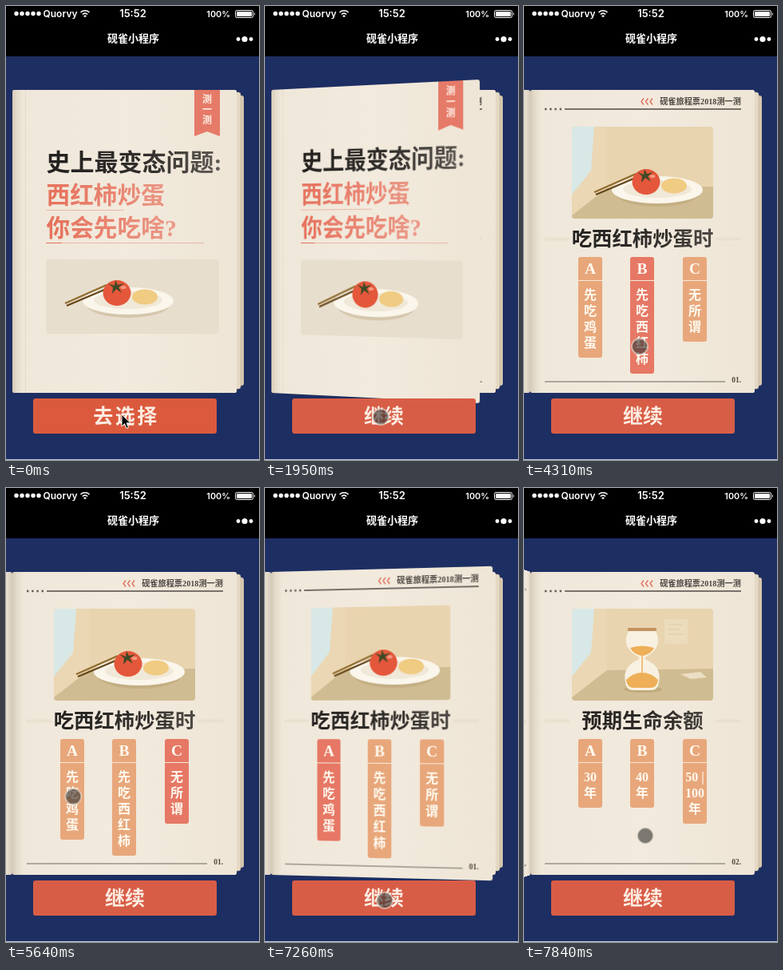
These frames come from a looping animation (317x568 px, 7.99 s). An HTML page:

```html
<!DOCTYPE html>
<html lang="zh-CN">
<head>
<meta charset="utf-8">
<title>测一测</title>
<style>
html, body { margin: 0; width: 100%; height: 100%; overflow: hidden; background: #1d2e62; }
#stage { position: relative; width: 317px; height: 568px; overflow: hidden; }
#stage > svg, #book { position: absolute; left: 0; top: 0; width: 317px; height: 568px; }
#book { perspective: 1900px; perspective-origin: 148.5px 294.5px; }
.page { position: absolute; left: 8px; top: 105px; width: 281px; height: 379px; transform-origin: 0 50%; }
.page svg { display: block; width: 281px; height: 379px; }
text { font-family: "Liberation Serif", "Noto Sans CJK SC", "Noto Sans CJK", serif; font-weight: 700; }
.heavy { font-weight: 900; }
.ui { font-family: Inter, "Noto Sans CJK SC", "Noto Sans CJK", sans-serif; font-weight: 600; fill: #fff; }
.opt rect { fill: #e8a77b; }
.opt.on rect { fill: #e67865; }
.opt text { fill: #fffaf0; }
</style>
</head>
<body>
<div id="stage">
  <svg viewBox="0 0 317 568">
    <defs>
      <linearGradient id="paper">
        <stop offset="0" stop-color="#d6cab8"/>
        <stop offset=".02" stop-color="#e4dbcb"/>
        <stop offset=".05" stop-color="#efe7d9"/>
        <stop offset=".5" stop-color="#f2eadd"/>
        <stop offset="1" stop-color="#eee5d6"/>
      </linearGradient>
      <linearGradient id="ink" gradientUnits="userSpaceOnUse" x1="50" y1="0" x2="268" y2="0">
        <stop offset=".1" stop-color="#242220"/>
        <stop offset=".6" stop-color="#33302d"/>
        <stop offset="1" stop-color="#5f5a54"/>
      </linearGradient>
      <linearGradient id="rose" gradientUnits="userSpaceOnUse" x1="50" y1="0" x2="220" y2="0">
        <stop offset="0" stop-color="#e6705b"/>
        <stop offset="1" stop-color="#eb9a89"/>
      </linearGradient>
      <clipPath id="frame"><rect x="60" y="151" width="177" height="115" rx="4"/></clipPath>
      <g id="dish">
        <ellipse cy="5" rx="52" ry="16" fill="#a98f62" opacity=".3"/>
        <ellipse rx="57" ry="17" fill="#faf6ec"/>
        <ellipse cy="-1" rx="43" ry="11" fill="#f0e8d8"/>
        <ellipse cx="21" cy="-5" rx="16" ry="9.5" fill="#f0cb82"/>
        <path d="M-79 3-27-20" stroke="#8f6c2e" stroke-width="2.2"/>
        <path d="M-77 6-25-16" stroke="#654619" stroke-width="2.4"/>
        <ellipse cx="-14" cy="-10" rx="17.5" ry="16" fill="#e4573b"/>
        <ellipse cx="-6" cy="-17" rx="3.5" ry="2" fill="#f29a80"/>
        <path d="M-25-22l8 3 1-7 3 6 8-2-7 5 4 7-7-5-5 6 1-8z" fill="#3d4a25"/>
      </g>
    </defs>
    <rect width="317" height="568" fill="#1d2e62"/>
    <rect x="270" y="112" width="28" height="363" rx="3" fill="#d5c6ae"/>
    <rect x="270" y="108" width="24" height="371" rx="3" fill="#e5d9c5" stroke="#c7b79f" stroke-width=".6"/>
  </svg>

  <div id="book"></div>

  <svg viewBox="0 0 317 568">
    <rect width="317" height="63"/>
    <g fill="#fff">
      <path d="M13 9.5h.01M20 9.5h.01M27 9.5h.01M34 9.5h.01M41 9.5h.01" stroke="#fff" stroke-width="5.4" stroke-linecap="round"/>
      <path d="M93.500 8a8 8 0 0 1 11 0M95.800 10.500a5 5 0 0 1 6.400 0" fill="none" stroke="#fff" stroke-width="1.6"/>
      <path d="M97 12.300a3 3 0 0 1 4 0l-2 2z"/>
      <rect x="287.500" y="5.500" width="22" height="9" rx="2" fill="none" stroke="#fff"/>
      <rect x="289" y="7" width="19" height="6" rx="1"/>
      <path d="M311 8q2 2 0 4z"/>
      <circle cx="291" cy="41.500" r="2.400"/><circle cx="299" cy="41.500" r="3.600"/><circle cx="307" cy="41.500" r="2.400"/>
    </g>
    <text class="ui" x="46.500" y="13.500" font-size="12">Quorvy</text>
    <text class="ui" x="159" y="13.500" font-size="13" text-anchor="middle">15:52</text>
    <text class="ui" x="281" y="13.500" font-size="10.800" text-anchor="end">100%</text>
    <text class="ui" x="159.500" y="45" font-size="13" text-anchor="middle">砚雀小程序</text>

    <rect id="button" x="34" y="491" width="230" height="44" rx="3"/>
    <text id="label" class="heavy" y="522" font-size="25" text-anchor="middle" fill="#fdece2"></text>
    <rect y="567" width="317" height="1" fill="#c9cfdb"/>
    <path id="arrow" d="M145 511v15l3.500-3.300 2.400 5.600 2.600-1.100-2.400-5.400h5z" stroke="#fff"/>
    <circle id="dot" r="10" fill="#3c3a38" fill-opacity=".65" stroke="#e6dfd4" stroke-opacity=".6" stroke-width="2"/>
  </svg>
</div>

<script>
const $ = id => document.getElementById(id);

// Text centred vertically on cy.
const txt = (x, cy, size, str, attrs = '') =>
  `<text x="${x}" y="${cy + size * .37}" font-size="${size}" ${attrs}>${str}</text>`;
const MID = 'text-anchor="middle"';

const page = (id, body) => `<div class="page" id="${id}"><svg viewBox="8 105 281 379">
  <rect x="8" y="105" width="281" height="379" rx="3" fill="url(#paper)"/>${body}</svg></div>`;

const option = (letter, x, lines) => {
  const h = 46 + lines.length * 20;
  return `<g class="opt" data-key="${letter}">
    <rect x="${x}" y="314" width="30" height="${h}" rx="3"/>
    <path d="M${x} 343.500h30" stroke="#f8e9d8"/>
    ${txt(x + 15, 328, 19.5, letter, MID)}
    ${lines.map((s, i) => txt(x + 15, 361 + i * 20, 16, s, MID)).join('')}</g>`;
};

const question = (id, title, number, picture, options) => page(id, `
  <path d="M150 115.500l-3 4 3 4M155.500 115.500l-3 4 3 4M161 115.500l-3 4 3 4" fill="none" stroke="#df6f5c" stroke-width="1.400"/>
  ${txt(272, 119, 10.2, '砚雀旅程票2018测一测', 'text-anchor="end" fill="#4a4540"')}
  <path d="M26 129h22" stroke="#5f5a55" stroke-width="2.400" stroke-dasharray="2.400 3.800"/>
  <path d="M51 129h221" stroke="#77716a" stroke-width="2"/>
  <g clip-path="url(#frame)">
    <path d="M60 151h177v115H60z" fill="#e9d4b0"/>
    <path d="M60 151h44v77l-44 34z" fill="#ebd7b4"/>
    <path d="M60 151h28l-4 55-24 30z" fill="#d8e8e6"/>
    <path d="M104 228l133-2v40H60v-4z" fill="#d0bc92"/>
    ${picture}
  </g>
  <path d="M25 290.500h32M240 290.500h32M25 292.500h32M240 292.500h32" stroke="#e2d7c5" stroke-width=".8"/>
  ${txt(148.5, 291, 25.4, title, `class="heavy" ${MID} fill="url(#ink)"`)}
  ${options.map((o, i) => option('ABC'[i], [68, 133, 199][i], o)).join('')}
  <path d="M26 470h226" stroke="#99928a" stroke-width="1.500"/>
  ${txt(272, 467, 9.5, number, 'text-anchor="end" fill="#55483f"')}`);

const cover = page('cover', `
  <path d="M24.500 105v379" stroke="#e6dccc"/>
  <path d="M236 105h32v58l-16-6-16 6z" fill="#e67a68"/>
  ${[...'测一测'].map((c, i) => txt(252, 117 + i * 13, 12, c, `${MID} fill="#fdf0e6"`)).join('')}
  ${txt(50.5, 195, 30, '史上最变态问题:', 'class="heavy" fill="url(#ink)"')}
  ${txt(50.5, 236, 29.7, '西红柿炒蛋', 'class="heavy" fill="url(#rose)"')}
  ${txt(50.5, 277, 29.7, '你会先吃啥?', 'class="heavy" fill="url(#rose)"')}
  <path d="M50 255.500h98M50 296.500h198" stroke="#eab3a4" stroke-width=".9"/>
  <path d="M50 296.500h20" stroke="#e4705c"/>
  <rect x="50" y="317" width="217" height="93" rx="4" fill="#e8decd"/>
  <use href="#dish" x="153" y="369"/>`);

const hourglass = `
  <ellipse cx="149" cy="252" rx="24" ry="4" fill="#a88f5e" opacity=".4"/>
  <path d="M176 164h29v31h-29z" fill="#ecdbbd"/>
  <path d="M181 171h17M181 177h14M181 183h18" stroke="#dfc9a4"/>
  <path d="M196 233l25-3 8 7-20 2z" fill="#ebdec4"/>
  <path d="M131 179q-10 20 12 32 3 2 0 4-20 8-16 28 1 10 10 10h22q9 0 10-10 4-20-16-28-3-2 0-4 22-12 12-32z" fill="#f8f1e2"/>
  <path d="M133 200q15-5 30 0-4 8-15 10-11-2-15-10z" fill="#eeaf58"/>
  <path d="M148 209v24" stroke="#eeaf58" stroke-width="1.500"/>
  <path d="M128 240q9-9 20-9t20 9q-1 10-10 10h-20q-9 0-10-10z" fill="#eeaf58"/>
  <rect x="130" y="175" width="36" height="4" rx="1.500" fill="#c2925f"/>`;

$('book').innerHTML =
  question('last', '预期生命余额', '02.', hourglass, [['30', '年'], ['40', '年'], ['50 |', '100', '年']]) +
  question('first', '吃西红柿炒蛋时', '01.', '<use href="#dish" x="167" y="230"/>',
    [[...'先吃鸡蛋'], [...'先吃西红柿'], [...'无所谓']]) +
  cover;

const LOOP = 7990, TICK = 147.5, START = 1645, FLIP = 2500;

// Touch point: time, x, y
const PATH = [
  [2390, 145, 514], [2680, 147, 501], [2830, 147, 478], [3120, 146, 432], [3270, 145, 426],
  [4310, 145, 426], [4460, 152, 428], [4600, 185, 408], [4750, 206, 395], [5050, 206, 395],
  [5340, 140, 395], [5490, 95, 388], [5640, 84, 386], [5790, 84, 386], [5930, 105, 430],
  [6080, 148, 500], [6220, 157, 503], [6520, 150, 516], [7260, 150, 516], [7840, 152, 435]
];

function touchAt(t) {
  const i = PATH.findIndex(p => p[0] > t);
  if (i === 0) return PATH[0].slice(1);
  if (i < 0) return PATH[PATH.length - 1].slice(1);
  const [a, b] = [PATH[i - 1], PATH[i]], f = (t - a[0]) / (b[0] - a[0]);
  return [a[1] + (b[1] - a[1]) * f, a[2] + (b[2] - a[2]) * f];
}

// cubic-bezier(.25, .1, .25, 1)
function ease(p) {
  if (p <= 0) return 0;
  if (p >= 1) return 1;
  const curve = (u, a, b) => 3 * a * u * (1 - u) ** 2 + 3 * b * u * u * (1 - u) + u ** 3;
  let lo = 0, hi = 1;
  for (let i = 0; i < 24; i++) {
    const m = (lo + hi) / 2;
    if (curve(m, .25, .25) < p) lo = m; else hi = m;
  }
  return curve(lo, .1, 1);
}

function turn(id, angle, above, below) {
  const s = $(id).style;
  s.transform = angle ? `rotateY(${-angle}deg)` : 'none';
  s.zIndex = angle > 90 ? below : above;
}

const options = document.querySelectorAll('#first .opt');

function draw(t) {
  turn('cover', t < START ? 0 : 180 * ease((t - 1620) / FLIP), 3, 1);
  turn('first', t < 7240 ? 0 : 180 * ease((t - 7025) / FLIP), 2, 2);

  const picked = t < 3250 ? '' : t < 5000 ? 'B' : t < 5750 ? 'C' : 'A';
  options.forEach(o => o.classList.toggle('on', o.dataset.key === picked));

  const opened = t >= START;
  const label = $('label');
  label.textContent = opened ? '继续' : '去选择';
  label.setAttribute('x', opened ? 149 : 150.5);
  label.setAttribute('letter-spacing', opened ? 0 : 2.5);
  $('button').setAttribute('fill', opened ? '#d85d46' : '#db5a3d');

  const touching = t >= START - 2 * TICK;
  $('arrow').style.display = touching ? 'none' : '';
  $('dot').style.display = touching ? '' : 'none';
  const [x, y] = touchAt(t + 8);
  $('dot').setAttribute('transform', `translate(${x} ${y})`);
}

let shown;
function loop() {
  const t = performance.now() % LOOP;
  const step = Math.max(-3, Math.floor((t - START) / TICK));
  if (step !== shown) draw(START + step * TICK);
  shown = step;
  requestAnimationFrame(loop);
}
loop();
</script>
</body>
</html>
```
